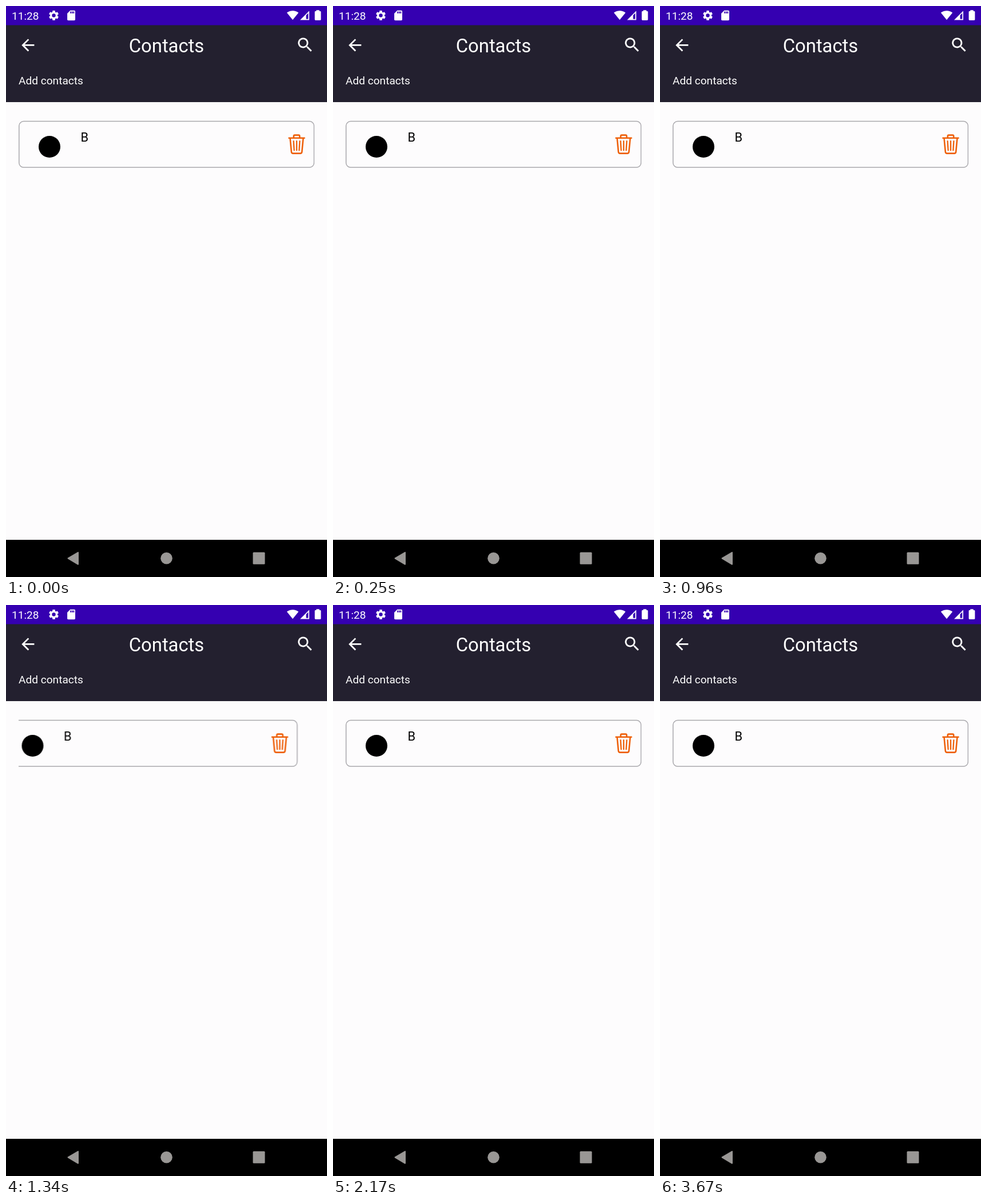
Recreate the animation shown at these times as an HTML page. Size 561 px wide and 998 px high, loop 3.71 s.

```html
<!DOCTYPE html>
<html lang="en">
<head>
<meta charset="utf-8">
<title>Contacts</title>
<style>
  html, body { margin: 0; width: 100%; height: 100%; overflow: hidden; background: #fdfcfd; }
  svg { display: block; width: 561px; height: 998px; }
  text { font-family: Roboto, sans-serif; }
  .light { fill: #fff; }
  .row { animation: swipe 3710ms linear infinite; }
  /* A short swipe to the left, then the row settles back */
  @keyframes swipe {
    0%, 31.5% { transform: translateX(0); animation-timing-function: ease-out; }
    36.1%, 38.3% { transform: translateX(-29.5px); animation-timing-function: ease-in-out; }
    43.1%, 100% { transform: translateX(0); }
  }
</style>
</head>
<body>
<svg viewBox="0 0 561 998">
  <defs>
    <clipPath id="list"><rect x="22" y="190" width="517" height="743"/></clipPath>
  </defs>

  <rect width="561" height="998" fill="#fdfcfd"/>
  <rect width="561" height="168" fill="#23202f"/>
  <rect width="561" height="33.5" fill="#3500b1"/>

  <g class="light">
    <!-- Status bar -->
    <text x="10" y="24" font-size="19.1">11:28</text>
    <path transform="translate(72.9 5.9) scale(.885)" fill-rule="evenodd" d="M19.14 12.94c.04-.3.06-.61.06-.94 0-.32-.02-.64-.07-.94l2.03-1.58c.18-.14.23-.41.12-.61l-1.92-3.32c-.12-.22-.37-.29-.59-.22l-2.39.96c-.5-.38-1.03-.7-1.62-.94l-.36-2.54c-.04-.24-.24-.41-.48-.41h-3.84c-.24 0-.43.17-.47.41l-.36 2.54c-.59.24-1.13.57-1.62.94l-2.39-.96c-.22-.08-.47 0-.59.22L2.74 8.87c-.12.21-.08.47.12.61l2.03 1.58c-.05.3-.09.63-.09.94s.02.64.07.94l-2.03 1.58c-.18.14-.23.41-.12.61l1.92 3.32c.12.22.37.29.59.22l2.39-.96c.5.38 1.03.7 1.62.94l.36 2.54c.05.24.24.41.48.41h3.84c.24 0 .44-.17.47-.41l.36-2.54c.59-.24 1.13-.56 1.62-.94l2.39.96c.22.08.47 0 .59-.22l1.92-3.32c.12-.22.07-.47-.12-.61zM12 15.6a3.6 3.6 0 1 1 0-7.2 3.6 3.6 0 0 1 0 7.2z"/>
    <path transform="translate(103.6 6.1) scale(.87)" fill-rule="evenodd" d="M18 2h-8L4 8v12c0 1.1.9 2 2 2h12c1.1 0 2-.9 2-2V4c0-1.1-.9-2-2-2zM12 8h-2V4h2zM15 8h-2V4h2zM18 8h-2V4h2z"/>
    <path transform="translate(490.6 5.6) scale(.87)" d="M12 21.5 23.64 7C23.2 6.66 18.7 3 12 3S.8 6.66.36 7z"/>
    <path fill-rule="evenodd" d="M514 24.5H530V8.5zM524.5 16.3V22.8H528.3V12.5z"/>
    <path d="M542.3 9V7.2H547.7V9H549Q550.4 9 550.4 10.4V23.6Q550.4 25 549 25H541Q539.6 25 539.6 23.6V10.4Q539.6 9 541 9z"/>

    <!-- Toolbar -->
    <path transform="translate(21.8 51.9) scale(1.38)" d="M20 11H7.83l5.59-5.59L12 4l-8 8 8 8 1.41-1.41L7.83 13H20z"/>
    <text x="280.5" y="81" font-size="32.8" text-anchor="middle">Contacts</text>
    <path transform="translate(506.1 51.3) scale(1.39)" fill-rule="evenodd" d="M15.5 14h-.79l-.28-.27A6.5 6.5 0 1 0 13.73 14.43l.27.28v.79l5 4.99L20.49 19zM9.5 14a4.5 4.5 0 1 1 0-9 4.5 4.5 0 0 1 0 9z"/>
    <text x="22" y="137" font-size="19.1">Add contacts</text>
  </g>

  <g clip-path="url(#list)">
    <g class="row">
      <rect x="22.8" y="201.6" width="515.6" height="80.4" rx="8" fill="none" stroke="#a9a8ac" stroke-width="1.5"/>
      <circle cx="76" cy="246" r="19"/>
      <text x="130.4" y="237.4" font-size="21.8">B</text>
      <g fill="none" stroke="#ee600a" stroke-width="2.6" stroke-linecap="round" stroke-linejoin="round">
        <path d="M494.5 230.7H521.5M502.8 230V227.5Q502.8 225.6 504.7 225.6H511.3Q513.2 225.6 513.2 227.5V230"/>
        <path d="M496.6 231.5 498.8 254.8Q499.1 257.6 501.8 257.6H514.2Q516.9 257.6 517.2 254.8L519.4 231.5"/>
        <path d="M502.6 236.2 503.6 252.2M508 236.2V252.2M513.4 236.2 512.4 252.2" stroke-width="2.3"/>
      </g>
    </g>
  </g>

  <!-- Navigation bar -->
  <rect y="933" width="561" height="65"/>
  <g fill="#999795">
    <path d="M108.5 965.3 126 955V975.8z" stroke="#999795" stroke-width="2" stroke-linejoin="round"/>
    <circle cx="280.5" cy="965.3" r="10.3"/>
    <rect x="431.5" y="954.8" width="21" height="21" rx="1.5"/>
  </g>
</svg>
</body>
</html>
```
